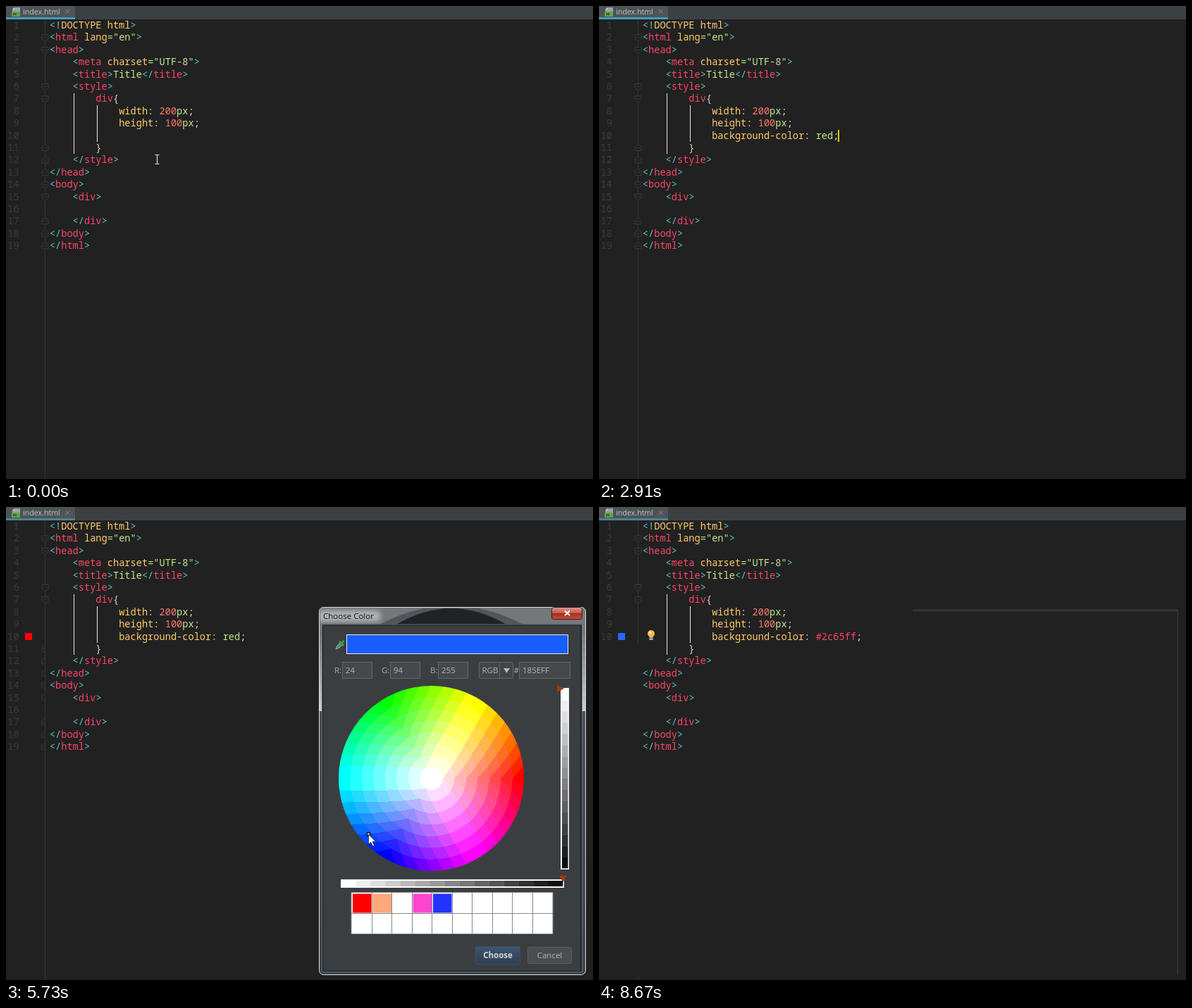
An HTML page with a canvas for the animation above (8770 ms loop, 833 by 672 pixels).

```html
<!DOCTYPE html>
<html lang="en">
<head>
<meta charset="UTF-8">
<title>Picking a colour in the editor</title>
<style>
html, body { margin: 0; width: 100%; height: 100%; overflow: hidden; background: #212121; }
#stage { position: relative; width: 833px; height: 672px; overflow: hidden; }
svg { display: block; }
#stage > svg, #dlg, #dlg > svg { position: absolute; left: 0; top: 0; }
#dlg { width: 833px; height: 672px; transform-origin: 633.5px 403.5px; }
canvas { position: absolute; left: 472px; top: 254px; width: 263px; height: 263px; border-radius: 50%; }
text { white-space: pre; }
.m { font: 13.66px "Noto Sans Mono", "DejaVu Sans Mono", monospace; }
.u { font: 11.5px "Open Sans", "Noto Sans CJK SC", sans-serif; }
</style>
</head>
<body>
<div id="stage">
  <svg id="code" width="833" height="672"></svg>
  <svg id="pop" width="833" height="672"></svg>
  <div id="dlg">
    <svg id="panel" width="833" height="672"></svg>
    <canvas id="coarse" width="263" height="263"></canvas>
    <canvas id="fine" width="263" height="263"></canvas>
    <svg id="mark" width="833" height="672"></svg>
  </div>
  <svg id="mouse" width="833" height="672"></svg>
</div>
<script>
const LOOP = 8770, CW = 8.196, LH = 17.4;
const $ = id => document.getElementById(id);
const esc = s => s.replace(/&/g, '&amp;').replace(/</g, '&lt;');
const rect = (x, y, w, h, fill, more = '') =>
  `<rect x="${x}" y="${y}" width="${w}" height="${h}" fill="${fill}" ${more}/>`;
const path = (d, fill, stroke = 'none', more = '') =>
  `<path d="${d}" fill="${fill}" stroke="${stroke}" ${more}/>`;
const text = (cls, x, y, fill, s, more = '') =>
  `<text class="${cls}" x="${x}" y="${y}" fill="${fill}" ${more}>${esc(s)}</text>`;
const colX = c => 61.8 + c * CW;
const lineY = n => 32 + (n - 1) * LH;

const last = {};
function put(id, html) {
  if (last[id] !== html) $(id).innerHTML = last[id] = html;
}

// ---------- editor ----------
const INK = { t: '#5fc3c3', r: '#fa4566', y: '#ffcb6b', g: '#c3e88d', o: '#f8776c', w: '#d8dcc8' };

// each line: indent, then "~"-separated runs led by an ink key
const SOURCE = [
  [0, 't<!~yDOCTYPE html~t>'],
  [0, 't<~rhtml~y lang~g="en"~t>'],
  [0, 't<~rhead~t>'],
  [4, 't<~rmeta~y charset~g="UTF-8"~t>'],
  [4, 't<~rtitle~t>~gTitle~t</~rtitle~t>'],
  [4, 't<~rstyle~t>'],
  [8, 'rdiv~w{'],
  [12, 'ywidth~w: ~o200~gpx~w;'],
  [12, 'yheight~w: ~o100~gpx~w;'],
  [12, ''],
  [8, 'w}'],
  [4, 't</~rstyle~t>'],
  [0, 't</~rhead~t>'],
  [0, 't<~rbody~t>'],
  [4, 't<~rdiv~t>'],
  [0, ''],
  [4, 't</~rdiv~t>'],
  [0, 't</~rbody~t>'],
  [0, 't</~rhtml~t>']
];
const OPEN = [2, 3, 6, 7, 14, 15], CLOSE = [11, 12, 13, 17, 18, 19];

function codeLine(n, col, runs) {
  if (!runs) return '';
  const spans = runs.split('~').map(r => `<tspan fill="${INK[r[0]]}">${esc(r.slice(1))}</tspan>`);
  return `<text class="m" x="${colX(col)}" y="${lineY(n)}">${spans.join('')}</text>`;
}

function foldMark(n, cut) {
  const y = lineY(n) - 4.5, d = OPEN.includes(n) ? 1 : -1;
  const shape = cut
    ? `M55 ${y - 4 * d}H51V${y + 2 * d}L55 ${y + 5 * d}M53 ${y}H55`
    : `M51 ${y - 4 * d}H60V${y + 2 * d}L55.5 ${y + 5 * d}L51 ${y + 2 * d}ZM53 ${y}H58`;
  return path(shape, '#212121', '#383838');
}

const step = (t, table) => {
  let v;
  for (const [at, x] of table) if (t >= at) v = x;
  return v;
};

const BG = 'ybackground-color~w: ';
const LINE10 = [[0, ''], [720, 'yb'], [980, 'yba'], [1040, 'yback'], [1780, BG + '~w;'],
  [2060, BG + '~gr~w;'], [2140, BG + '~gre~w;'], [2290, BG + '~gred~w;'], [7330, BG + '~r#2c65ff~w;']];
// caret column, or -1 when hidden
const CARET = [[0, -1], [250, 12], [720, 13], [980, 14], [1040, 16], [1780, 30], [2060, 31],
  [2140, 32], [2290, 33], [2910, 34], [3730, -1], [7800, 38], [7890, -1], [8390, 38], [8670, -1]];

function drawCode(t) {
  const dim = t >= 4630 && t < 7330 || t >= 8670, torn = t >= 7260, cut = t >= 4630;
  let s = rect(0, 0, 833, 19, '#3c4043') + rect(0, 0, 98, 17, '#4e5356')
    + rect(0, 16, 98, 3, dim ? '#4b8496' : '#3f9fbd')
    + path('M12 2H20V9H9V5Z', '#9aa3a8') + path('M12 2V5H9Z', '#d0d5d8')
    + rect(8, 8, 12, 7, '#62a352') + path('M11 9.5V13.5M11 11.5H14M14 9.5V13.5', 'none', '#24401e')
    + text('u', 24, 12, '#c0c4c6', 'index.html', 'style="font-size:10.65px"')
    + path('M84.5 5L90.5 11M90.5 5L84.5 11', 'none', '#858a8d');
  s += path(torn ? 'M55.5 19V193M55.5 668V672' : 'M55.5 19V672', 'none', '#343434');
  SOURCE.forEach(([col, runs], i) => {
    const n = i + 1;
    if (!torn || n <= 10)
      s += text('m', 18.6, lineY(n), '#3b3b3b', '' + n, 'text-anchor="end"');
    s += n === 10 ? codeLine(n, 12, step(t, LINE10)) : codeLine(n, col, runs);
  });
  for (const n of [...OPEN, ...CLOSE])
    if (!torn || n <= 10) s += foldMark(n, cut && n > 10);
  s += path('M96.5 124V210M129.5 141V193', 'none', '#e6e6e6');
  if (t >= 3240) s += rect(27, 179, 10, 10, t < 7330 ? '#ff0000' : '#2c65ff');
  if (t >= 4050 && t < 4630 || t >= 7400)
    s += `<circle cx="74" cy="180" r="5" fill="#fbb84a"/><circle cx="72.5" cy="178.5" r="2" fill="#ffe2a0"/>`
      + rect(71.5, 184, 5, 5, '#b8b4ac') + path('M71.5 186.5H76.5', 'none', '#77736c');
  const c = step(t, CARET);
  if (c >= 0) s += rect(Math.round(colX(c)) - 1, 176, 2, 17, '#f5c518');
  if (torn) s += rect(445, 145, 377, 3.5, '#343434') + rect(820, 148, 2, 516, '#303030');
  put('code', s);
}

// ---------- completion popups ----------
const ROW = 19.25, TOP = 194;
const WEB = { c: '#d9493b', f: '#d4632b', e: '#4aa3cf', o: '#b3202c', s: '#4388c6' };
const PROPS = [['ground-color', 1], ['ground', 1], ['face-visibility', 3, 'fe'], ['ground-attachment', 1],
  ['ground-blend-mode', 3, 'cfes'], ['ground-clip', 3, 'cfeos'], ['ground-image', 1],
  ['ground-origin', 3], ['ground-position', 1], ['ground-repeat', 1]];
const NAMED = {
  '': 'aliceblue antiquewhite aqua aquamarine azure beige bisque black blanchedalmond blue blueviolet',
  r: 'red rosybrown royalblue aquamarine azure brown chartreuse coral cornflowerblue crimson darkblue',
  re: 'red rebeccapurple green grey darkred darkgreen darkgrey forestgreen indianred lightgreen orangered',
  red: 'red darkred indianred mediumvioletred orangered palevioletred'
};

function frame(x, w, h, rows, scroll) {
  const foot = TOP + h - 4;
  return rect(x, TOP, w, h, '#3c3f42')
    + `<svg x="${x}" y="${TOP}" width="${w}" height="${h - 15}" viewBox="${x} ${TOP} ${w} ${h - 15}">${rows}</svg>`
    + (scroll ? rect(x + w - 9, TOP + 1, 8, 61, '#5c5f61') : '')
    + text('u', x + 2, foot, '#c0c3c5', 'Press Ctrl+句点 to choose the selected (or first) suggestion and insert a dot afterwards', 'style="font-size:9.6px"')
    + text('u', x + 391, foot, '#589df6', '>>', 'style="font-size:10px" text-decoration="underline"')
    + text('u', x + w - 12, foot, '#4a9fe0', 'π', 'style="font-size:12px"');
}

// text with the typed part in purple
function match(x, y, word, from, len, ink) {
  const part = (a, b, f) => `<tspan fill="${f}">${word.slice(a, b)}</tspan>`;
  return `<text class="m" x="${x}" y="${y}">` + part(0, from, ink)
    + part(from, from + len, '#c987e0') + part(from + len, word.length, ink) + '</text>';
}

function propPopup(n) {
  let s = match(160.2, 207.5, 'back'.slice(0, n), 0, n, '#bbb')
    + text('m', 160.2 + (n + 1) * CW, 207.5, '#6b6e70', 'Emmet abbreviation')
    + text('m', 580, 207.5, '#c3c6c8', 'background: #;', 'text-anchor="end"');
  PROPS.forEach(([rest, ver, web = ''], i) => {
    const y = TOP + (i + 1) * ROW, sel = i === 0;
    if (sel) s += rect(159, y, 428, ROW, '#0052a5');
    s += rect(145, y + 3.5, 12, 12, '#8d6b39', 'rx="2"')
      + text('u', 148.2, y + 13, '#2e2415', 'P', 'style="font-size:9px"')
      + match(160.2, y + 14, 'back' + rest, 0, n, sel ? '#e4e8ee' : '#bbbfc1')
      + text('m', 580, y + 14, sel ? '#d5dce6' : '#6b6e70', `CSS ${ver}.0`, 'text-anchor="end"');
    [...web].forEach((k, j) => {
      s += `<circle cx="${504.5 - (web.length - 1 - j) * 14.7}" cy="${y + 10}" r="6" fill="${WEB[k]}"/>`;
    });
  });
  return frame(141, 460, 217, s, true);
}

function namePopup(typed) {
  const names = NAMED[typed].split(' '), short = names.length < 9;
  let s = '';
  names.forEach((name, i) => {
    const y = TOP + i * ROW;
    if (!i) s += rect(305, y, short ? 387 : 373, ROW, '#0052a5');
    s += rect(288, y + 4, 12, 12, name)
      + match(307.8, y + 14, name, Math.max(0, name.indexOf(typed)), typed.length, i ? '#bbbfc1' : '#e4e8ee');
  });
  return frame(275, 417, short ? 130 : 217, s, !short);
}

const POPUPS = [[0, ''], [800, propPopup(1)], [980, propPopup(2)], [1040, propPopup(3)], [1470, propPopup(4)],
  [1780, ''], [1840, namePopup('')], [2060, namePopup('r')], [2140, namePopup('re')],
  [2290, namePopup('red')], [2910, '']];

// ---------- colour dialog ----------
const CX = 603.5, CY = 385.5, R = 131.5;

function hsv(dx, dy) {
  const s = Math.min(1, Math.hypot(dx, dy) / R);
  const h = (Math.atan2(-dy, dx) * 3 / Math.PI + 6) % 6;
  return [5, 3, 1].map(k => {
    const q = (k + h) % 6;
    return 1 - s * Math.max(0, Math.min(q, 4 - q, 1));
  });
}

const fineLevel = c => 1 - Math.min(7, Math.floor((1 - c) * 8)) / 7;
function band(c, edges, levels) {
  const i = edges.findIndex(e => 1 - c < e);
  return 1 - levels[i < 0 ? edges.length : i];
}
function coarseLevel(c, i, rgb) {
  return c === Math.min(...rgb)
    ? band(c, [.09, .21, .34, .48, .74], [0, .13, .26, .4, .63, .92])
    : band(c, [.21, .48, .74], [.03, .33, .63, .92]);
}

function paintWheel(id, level) {
  const g = $(id).getContext('2d'), n = 263, img = g.createImageData(n, n);
  for (let y = 0; y < n; y++) for (let x = 0; x < n; x++) {
    const rgb = hsv(x - n / 2 + .5, y - n / 2 + .5).map(level);
    img.data.set([...rgb.map(c => c * 255), 255], (y * n + x) * 4);
  }
  g.putImageData(img, 0, 0);
}

const DEFS = `<defs>
<linearGradient id="side" gradientUnits="userSpaceOnUse" x1="0" y1="142" x2="0" y2="665">
<stop offset="0" stop-color="#75787b"/><stop offset=".07" stop-color="#75787b"/><stop offset=".283" stop-color="#c9cdd0"/>
<stop offset=".284" stop-color="#46515c"/><stop offset="1" stop-color="#3a444e"/></linearGradient>
<linearGradient id="red" x2="0" y2="1"><stop offset="0" stop-color="#dd9a8e"/><stop offset=".48" stop-color="#c4574a"/>
<stop offset=".5" stop-color="#a52a1c"/><stop offset="1" stop-color="#c5503a"/></linearGradient>
<linearGradient id="btn" x2="0" y2="1"><stop offset="0" stop-color="#3f546e"/><stop offset="1" stop-color="#2f3e50"/></linearGradient>
<filter id="soft" x="-20%" y="-60%" width="140%" height="220%"><feGaussianBlur stdDeviation="3"/></filter>
<clipPath id="cap"><path d="M446 144H821V167H446Z"/></clipPath></defs>`;

const hex2 = v => v.toString(16).toUpperCase().padStart(2, '0');
const gray = v => `rgb(${v},${v},${v})`;

function field(label, lx, x, w, value, on) {
  return text('u', lx, 235.5, '#a9adaf', label)
    + rect(x + .5, 220.5, w - 1, 23, '#45494b', `stroke="${on ? '#4f83b8' : '#63676a'}"`)
    + (on ? rect(x + 4, 224, 41, 16, '#4470ad') : '')
    + text('u', x + 5, 235.5, on ? '#d5e2f2' : '#b4b8ba', value);
}

function ramp(n, draw) {
  let s = '';
  for (let i = 0; i < n; i++) s += draw(i, gray(Math.round(255 - 240 * i / (n - 1))));
  return s;
}

function drawPanel(rgb, focus, hot, rough) {
  const fill = `rgb(${rgb})`, nv = rough ? 8 : 16, nh = rough ? 8 : 15;
  let s = DEFS + rect(444.5, 142.5, 378, 522, 'url(#side)', 'rx="6" stroke="#d9dee2"')
    + `<g clip-path="url(#cap)">${rect(446, 144, 375, 24, '#74787b')}`
    + path('M528 168Q632 112 736 168Z', rough ? '#52677c' : '#50565b')
    + path('M552 168Q632 120 712 168Z', rough ? '#2d4358' : '#202326')
    + `${rect(440, 147, 92, 16, '#c3c5c7', 'rx="8" opacity=".75" filter="url(#soft)"')}</g>`
    + text('u', 450, 158.5, '#101214', 'Choose Color')
    + rect(774.5, 142.5, 43, 17, 'url(#red)', 'rx="3" stroke="#3a1a18"')
    + path('M793 147.5L800 154M800 147.5L793 154', 'none', '#fff', 'stroke-width="2"')
    + rect(449, 167.5, 367.5, 492.5, '#3b3e41', 'stroke="#15191c" stroke-width="2"')
    + path('M448.5 167V660.5H817.5V167Z', 'none', '#8f979d', 'stroke-width=".7"')
    + path('M468 202L470 197L475 192L478 195L473 200Z', '#4f8f63', '#9fc4a8', 'stroke-width=".8"')
    + path('M473 191L479 197M476 194L479.5 190', 'none', '#3f9a5a', 'stroke-width="3"')
    + rect(482.5, 180.5, 316, 29, '#222') + rect(483.5, 181.5, 314, 27, fill, 'stroke="#f4f4f4"')
    + field('R:', 466, 477, 43, '' + rgb[0]) + field('G:', 533, 545, 43, '' + rgb[1])
    + field('B:', 602, 613, 43, '' + rgb[2])
    + field('#', 720.5, 728, 73, rgb.map(hex2).join(''), focus)
    + rect(671.5, 220.5, 48, 23, '#414548', 'stroke="#63676a" rx="2"')
    + path('M700.5 221V243', 'none', '#63676a') + path('M706 229H715L710.5 236Z', '#b4b8ba')
    + text('u', 675.5, 235.5, '#b4b8ba', 'RGB');
  s += rect(787.5, 257.5, 11, 257, '#fff', 'stroke="#f2f2f2"')
    + ramp(nv, (i, c) => rect(789, 259 + i * 254 / nv, 8.5, 254 / nv + .3, c))
    + rect(475.5, 529.5, 316, 11, '#fff', 'stroke="#f2f2f2"')
    + ramp(nh, (i, c) => rect(476 + i * 314 / nh, 531, 314 / nh + .3, 8, c))
    + path('M782 253L792 258L782 263Z', '#9c3c12') + path('M785 523.5H796L790.5 533Z', '#9c3c12');
  s += rect(490, 547.5, 286, 59, '#fff');
  ['#ff0000', '#ffa878', '', '#ff44d0', '#2432ff'].forEach((c, i) => {
    if (c) s += rect(492 + i * 28.5, 549.5, 26.5, 27, c);
  });
  let grid = 'M490 577.5H776M490 547.5H776V606.5H490Z';
  for (let i = 1; i < 10; i++) grid += `M${490.5 + Math.round(i * 28.5)} 548V606`;
  s += path(grid, 'none', '#85888a');
  s += rect(666.5, 624.5, 63, 25, 'url(#btn)', `rx="2" stroke="${hot ? '#5d8fc8' : '#34506e'}" stroke-width="${hot ? 2 : 1}"`)
    + text('u', 698, 641, '#d0d4d8', 'Choose', 'text-anchor="middle" font-weight="700" style="font-weight:700"')
    + rect(740.5, 625.5, 62, 23, '#4a4e50', 'rx="2" stroke="#585c5f"')
    + text('u', 771.5, 641, '#b4b8ba', 'Cancel', 'text-anchor="middle"');
  put('panel', s);
}

function drawDialog(t) {
  const d = $('dlg'), on = t >= 4630 && t < 7260;
  d.style.display = on ? 'block' : 'none';
  if (!on) return;
  const p = Math.min(1, (t - 4630) / 400), e = 1 - (1 - p) ** 2;
  const out = Math.max(0, (t - 6960) / 300);
  d.style.opacity = Math.min(1, e + .05) * (1 - out);
  d.style.transform = `scale(${.88 + .12 * e - .1 * out})`;
  const rough = p < 1;
  $('coarse').style.display = rough ? 'block' : 'none';
  $('fine').style.display = rough ? 'none' : 'block';
  const [x, y] = t < 5520 ? [CX + R, CY] : pointer(Math.min(t, 5820));
  const rgb = t < 5520 ? [255, 0, 0] : t >= 5820 ? [44, 101, 255]
    : hsv(x - CX, y - CY).map(c => Math.round(c * 255));
  drawPanel(rgb, t < 5520, t >= 6690, rough);
  put('mark', rect(x - 2, y - 2, 4, 4, '#fff', 'stroke="#000" stroke-width="1.3"'));
}

// ---------- mouse ----------
const TRACK = [[0, 214.5, 218], [720, 214.5, 218], [800, 213, 217], [2060, 213, 217], [3420, 215, 218],
  [3730, 215, 218], [3900, 160, 247], [4060, 95, 228], [4270, 38, 193], [4450, 36, 183], [4630, 36, 183],
  [4900, 64, 188], [5160, 320, 330], [5460, 500, 440], [5520, 500, 440], [5660, 506, 468], [5820, 525, 461],
  [6100, 525, 461], [6400, 640, 575], [6690, 706, 640], [6960, 706, 640], [7740, 747, 628], [LOOP, 747, 628]];

function pointer(t) {
  const i = Math.max(1, TRACK.findIndex(k => k[0] > t));
  const [a, x, y] = TRACK[i - 1], [b, u, v] = TRACK[i];
  const p = (t - a) / (b - a);
  return [x + (u - x) * p, y + (v - y) * p];
}

const ARROW = path('M0 0V14.5L3.4 11.3L6 17L8.3 16L5.8 10.5H10.4Z', '#fff', '#111', 'stroke-width=".8"');
const BEAM = path('M-3 -6.5H-.8L0 -6L.8 -6.5H3M0 -6V6M-3 6.5H-.8L0 6L.8 6.5H3', 'none', '#e0e0e0', 'stroke-width="1.2"');

function drawMouse(t) {
  if (t >= 2060 && t < 3420 || t >= 7890) return put('mouse', '');
  const [x, y] = pointer(t);
  const beam = t < 720 || t >= 3420 && t < 4630 && x > 56 || t >= 7260;
  put('mouse', `<g transform="translate(${x.toFixed(1)} ${y.toFixed(1)})">${beam ? BEAM : ARROW}</g>`);
}

function draw() {
  const t = performance.now() % LOOP;
  drawCode(t);
  put('pop', step(t, POPUPS));
  drawDialog(t);
  drawMouse(t);
  requestAnimationFrame(draw);
}

paintWheel('coarse', coarseLevel);
paintWheel('fine', fineLevel);
draw();
</script>
</body>
</html>
```
